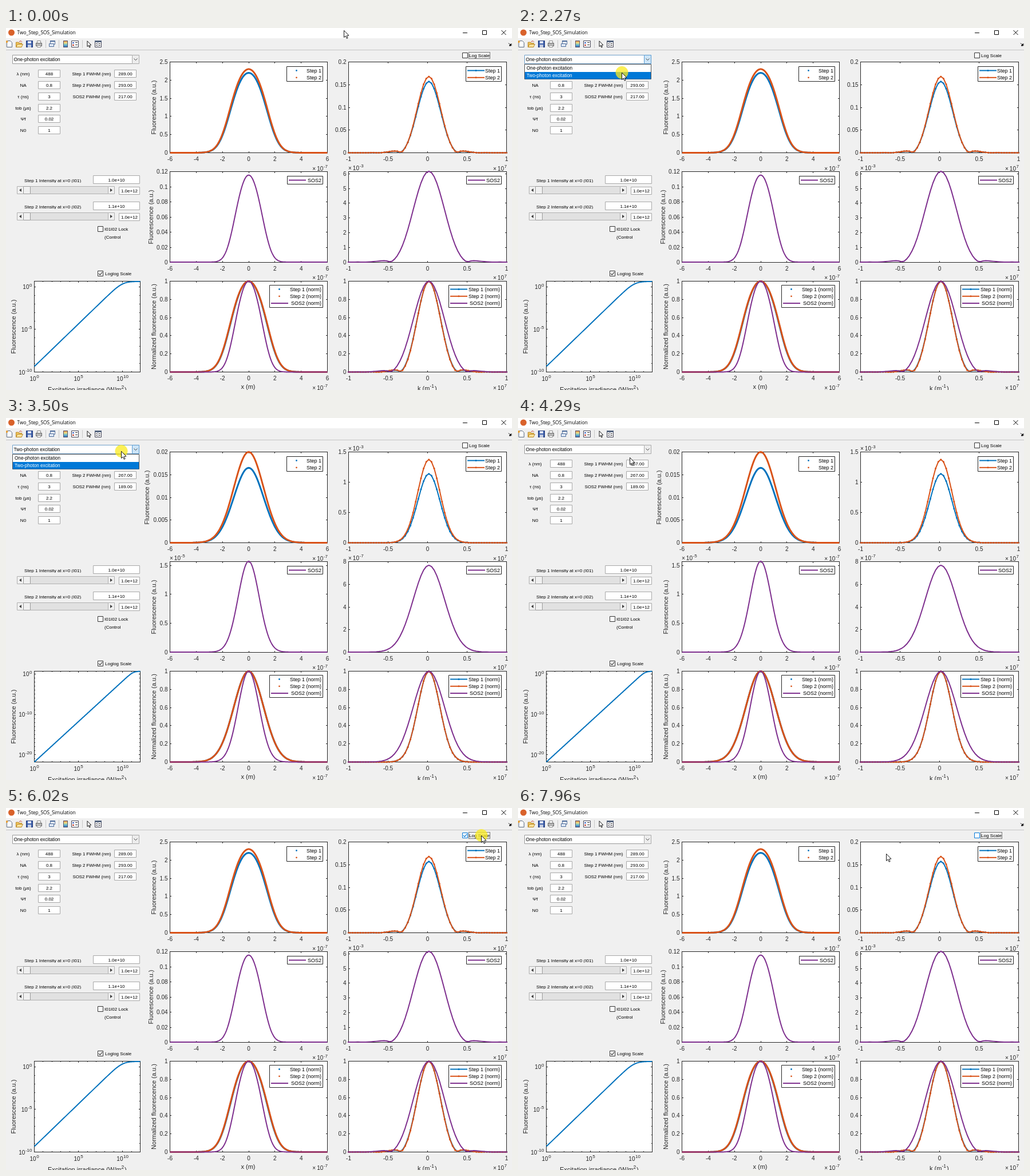
Write an HTML page with a canvas that moves like this. It is 884 px wide and 634 px high and loops after 8 s.

```html
<!DOCTYPE html>
<html lang="en">
<head>
<meta charset="utf-8">
<title>Two_Step_SOS_Simulation</title>
<style>
html, body { margin: 0; width: 100%; height: 100%; overflow: hidden; background: #f0f0f0; }
canvas { display: block; }
</style>
</head>
<body>
<canvas id="c" width="884" height="634"></canvas>
<script>
const g = document.getElementById('c').getContext('2d');
const LOOP = 8000, INK = '#262626';
const BLUE = '#0072bd', ORANGE = '#d95319', PURPLE = '#7e2f8e';
const SANS = '"Liberation Sans", Arial, sans-serif';

// ---------- drawing helpers ----------
function text(s, x, y, size = 8.1, align = 'left', color = '#000', font = SANS) {
  g.font = size + 'px ' + font;
  g.textAlign = align;
  g.fillStyle = color;
  g.fillText(s, x, y);
}
function box(x, y, w, h, fill, stroke) {
  if (fill) { g.fillStyle = fill; g.fillRect(x, y, w, h); }
  if (stroke) {
    g.strokeStyle = stroke;
    g.lineWidth = 1;
    g.strokeRect(x + .5, y + .5, w - 1, h - 1);
  }
}
function path(pts, color, width = 1, fill) {
  g.beginPath();
  pts.forEach(([x, y]) => g.lineTo(x, y));
  if (fill) { g.closePath(); g.fillStyle = fill; g.fill(); }
  if (color) { g.strokeStyle = color; g.lineWidth = width; g.lineJoin = 'round'; g.stroke(); }
}
function dot(x, y, r, color) {
  g.beginPath();
  g.arc(x, y, r, 0, 7);
  g.fillStyle = color;
  g.fill();
}
// "10^-7" style label: base with a raised exponent
function power(base, exp, x, y, align) {
  g.font = '10px ' + SANS;
  const w = g.measureText(base).width + .6;
  g.font = '8px ' + SANS;
  const all = w + g.measureText(exp).width;
  x -= align === 'right' ? all : align === 'center' ? all / 2 : 0;
  text(base, x, y, 10, 'left', INK);
  text(exp, x + w, y - 4.5, 8, 'left', INK);
}
const factor = (exp, x, y, align) => power('×\u200910', String(exp), x, y, align);
function label(s, x, y, align) {
  if (s[0] === '^') power('10', s.slice(1), x, y + .5, align);
  else text(s, x, y, 10, align, INK);
}
function upright(s, x, y) {
  g.save();
  g.translate(x, y);
  g.rotate(-Math.PI / 2);
  text(s, 0, 4, 11, 'center', INK);
  g.restore();
}

// ---------- model ----------
const FMAX = 4.336, SPAN = 3000; // SPAN in nm sets the frequency step 1 / SPAN
const sat = q => FMAX * q / (1 + q);
const scaled = (a, peak) => { const m = Math.max(...a); return a.map(v => v / m * peak); };

function model(o) {
  const X = [...Array(361)].map((_, i) => (i - 180) * 5);
  const q = X.map(x => o.q * Math.exp(-o.k * x * x));
  const f1 = q.map(sat), f2 = q.map(v => sat(v * o.r));
  const f = [f1, f2, f1.map((v, i) => o.r * v - f2[i])];
  const spectrum = a => [...Array(32)].map((_, n) => {
    const w = 2 * Math.PI * n / SPAN;
    return Math.abs(a.reduce((s, v, i) => s + v * Math.cos(w * X[i]), 0));
  });
  o.x = f.map((a, i) => scaled(a, o.px[i]));
  o.f = f.map((a, i) => scaled(spectrum(a), o.pk[i]));
  return o;
}
const WAIST = 488 / (Math.PI * .8);
const ONE = model({
  q: 1.03, k: 2 / WAIST ** 2, r: 1.1, order: 1, px: [2.2, 2.303, .115], pk: [.157, .168, .00614],
  x1: [2.5, .5], x2: [.12, .02], k1: [.2, .05], k2: [6.14, 1, -3],
  lab: [258, 253], ll: [-10, .66, 5], fwhm: ['289.00', '293.00', '217.00']
});
const TWO = model({
  q: .0038, k: 4 * Math.LN2 / 267 ** 2, r: 1.21, order: 2,
  px: [.0165, .02, 1.565e-5], pk: [1.14e-3, 1.375e-3, 7.65e-7],
  x1: [.02, .005], x2: [1.565, .5, -5], k1: [1.5, .5, -3], k2: [8, 2, -7],
  lab: [246, 258], ll: [-21.78, .66, 10], fwhm: ['267.00', '267.00', '189.00']
});

// ---------- axes ----------
const LEFT = 286, LW = 275, RIGHT = 598, RW = 276, H = 159;

function linear(min, max, step) {
  const out = [];
  for (let v = min; v <= max + 1e-9; v += step)
    out.push([(v - min) / (max - min), String(+v.toFixed(4))]);
  return out;
}
function decades(lo, hi, step) {
  const out = [];
  for (let e = Math.ceil(lo); e <= hi; e++)
    out.push([(e - lo) / (hi - lo), e % step ? '' : '^' + e]);
  return out;
}
function axes(x, top, w, xt, yt) {
  const y = Math.round(top);
  box(x, y, w + 1, H + 1, '#fff', INK);
  g.fillStyle = INK;
  for (const [p, s] of xt) {
    const px = Math.round(x + p * w), n = s ? 3 : 2;
    g.fillRect(px, y, 1, n);
    g.fillRect(px, y + H + 1 - n, 1, n);
  }
  for (const [p, s] of yt) {
    const py = Math.round(y + H - p * H), n = s ? 3 : 2;
    g.fillRect(x, py, n, 1);
    g.fillRect(x + w + 1 - n, py, n, 1);
  }
  for (const [p, s] of xt) if (s) label(s, x + p * w + .5, y + H + 15, 'center');
  for (const [p, s] of yt) if (s) label(s, x - 3.5, y + H - p * H + 4, 'right');
}
function clipped(x, y, w, draw) {
  g.save();
  g.beginPath();
  g.rect(x - 1, y - 1, w + 3, H + 4);
  g.clip();
  draw();
  g.restore();
}
function spaceCurve(y, data, max, color, width) {
  const pts = data.map((v, i) => [LEFT + .5 + LW * (.5 + (i - 180) * 5 / 1200), y + H + .5 - v / max * H])
    .filter(p => p[0] > LEFT && p[0] < LEFT + LW + 1);
  clipped(LEFT, y, LW, () => path(pts, color, width));
}
// the frequency grid is centred half a sample to the right of zero
function freqCurve(y, data, toUnit, color, dots) {
  const step = RW / 2 * 100 / SPAN, pts = [];
  for (let n = -31; n <= 30; n++)
    pts.push([RIGHT + .5 + RW / 2 + step * (n + .5), y + H + .5 - toUnit(data[Math.abs(n)]) * H]);
  clipped(RIGHT, y, RW, () => {
    path(pts, color, 2);
    if (dots) pts.forEach(p => dot(p[0], p[1], 1.5, color));
  });
}
function legend(x, y, w, rows, dots) {
  const h = rows.length === 1 ? 15 : rows.length === 2 ? 27 : 40;
  box(x, y, w, h, '#fff', INK);
  rows.forEach(([s, color], i) => {
    const cy = y + 7.5 + i * 12.3, mark = color !== PURPLE;
    if (dots && mark) dot(x + 17.5, cy, 1.4, color);
    else path([[x + 3, cy], [x + 33, cy]], color, 2);
    if (!dots && mark) dot(x + 18, cy, 1.5, color);
    text(s, x + w - 3, cy + 3.2, 9, 'right', '#000');
  });
}

function plots(m, log) {
  const xt = linear(-6, 6, 2), kt = linear(-1, 1, .5);
  const step = [['Step 1', BLUE], ['Step 2', ORANGE]], sos = [['SOS2', PURPLE]];
  const norm = [...step, ...sos].map(([s, c]) => [s + ' (norm)', c]);
  const colors = [BLUE, ORANGE, PURPLE];
  const top = [59, 250.5, 443];
  const unit = ([max, , e = 0]) => max * 10 ** e;

  [m.x1, m.x2, [1, .2]].forEach((a, row) => {
    const y = top[row];
    axes(LEFT, y, LW, xt, linear(0, a[0], a[1]));
    factor(-7, LEFT + LW + 1, y + 190.5, 'right');
    if (a[2]) factor(a[2], LEFT, y - 2, 'left');
    m.x.forEach((d, i) => {
      if (row === 2) spaceCurve(y, scaled(d, 1), 1, colors[i], i < 2 ? 3 : 2);
      else if ((i < 2) === (row === 0)) spaceCurve(y, d, unit(a), colors[i], i < 2 ? 3 : 2);
    });
  });
  legend(490, 67, 64, step, true);
  legend(491, 259, 63, sos);
  legend(460, 450, 94, norm, true);

  // lowest decade, highest decade, label step
  const range = [[-6.21, 0, 2], [-6, -2, 1], [-6, 0, 2]];
  [m.k1, m.k2, [1, .2]].forEach((a, row) => {
    const y = top[row], [lo, hi] = range[row];
    axes(RIGHT, y, RW, kt, log ? decades(...range[row]) : linear(0, a[0], a[1]));
    factor(7, RIGHT + RW + 1, y + 190.5, 'right');
    if (a[2] && !log) factor(a[2], RIGHT, y - 2, 'left');
    const toUnit = log ? v => (Math.log10(v) - lo) / (hi - lo) : v => v / unit(a);
    m.f.forEach((d, i) => {
      if (row === 2) freqCurve(y, scaled(d, 1), toUnit, colors[i], i < 2);
      else if ((i < 2) === (row === 0)) freqCurve(y, d, toUnit, colors[i], i < 2);
    });
  });
  legend(803, 67, 63, step);
  legend(804, 259, 62, sos);
  legend(773, 450, 93, norm);

  upright('Fluorescence (a.u.)', m.lab[0], 139);
  upright('Fluorescence (a.u.)', m.lab[1], 331);
  upright('Normalized fluorescence (a.u.)', 258, 523);
  text('x (m)', 423, 631.5, 11, 'center', INK);
  text('k (m', 719, 635, 11, 'left', INK);
  text('-1', 740.5, 630, 8.5, 'left', INK);
  text(')', 749, 635, 11, 'left', INK);

  const [lo, hi, every] = m.ll;
  axes(49, 443, 185, decades(0, 12, 5), decades(lo, hi, every));
  const pts = [...Array(121)].map((_, i) => {
    const f = Math.log10(sat(m.q * 10 ** (m.order * (i / 10 - 10))));
    return [49.5 + i / 120 * 185, 443.5 + H - (f - lo) / (hi - lo) * H];
  });
  clipped(49, 443, 185, () => path(pts, BLUE, 2));
  upright('Fluorescence (a.u.)', 13, 523);
  text('Excitation irradiance (W/m', 73, 637, 11, 'left', INK);
  text('2', 201.5, 632, 8.5, 'left', INK);
  text(')', 207, 637, 11, 'left', INK);
}

// ---------- window ----------
function titleBar() {
  box(0, 0, 884, 18, '#fff');
  dot(9.5, 8, 5.5, '#d9622b');
  text('Two_Step_SOS_Simulation', 19.5, 11.2, 8.4, 'left', '#000', '"Open Sans", sans-serif');
  path([[798, 8.5], [806, 8.5]], '#000');
  box(832, 4, 8, 8, null, '#000');
  path([[865.5, 4], [873.5, 12]], '#000');
  path([[873.5, 4], [865.5, 12]], '#000');
}
function toolBar() {
  box(0, 38, 884, 1, '#c4c4c4');
  for (const x of [69, 92, 133]) box(x, 21, 1, 14, '#c8c8c8');
  // new
  path([[1.5, 22.5], [7.5, 22.5], [10.5, 25.5], [10.5, 33.5], [1.5, 33.5]], '#5a6a80', 1, '#fff');
  dot(1.5, 24, 2, '#e8a33a');
  // open
  path([[17.5, 33], [17.5, 25], [22, 25], [23, 26.5], [27.5, 26.5], [27.5, 33]], '#b98a2c', 1, '#f0c45a');
  path([[17.5, 33.5], [20, 28.5], [29.5, 28.5], [27, 33.5]], '#b98a2c', 1, '#fbe29a');
  path([[23, 24], [26, 22.5], [28, 24.5]], '#c0392b');
  // save
  box(35, 22, 12, 12, '#3c5ea8', '#22397a');
  box(38, 23, 6, 4, '#e8eefc');
  box(38, 29, 6, 5, '#c3cbe0');
  // print
  box(54, 22, 7, 5, '#fff', '#888');
  box(52, 26, 11, 6, '#b9b9b9', '#666');
  box(54, 30, 7, 4, '#fff', '#888');
  // link
  box(77, 22, 9, 7, '#fff', '#4a6a9a');
  box(77, 22, 9, 2, '#4a6a9a');
  box(75, 27, 9, 6, '#dfe8f5', '#4a6a9a');
  // colour bar
  const bar = g.createLinearGradient(0, 22, 0, 34);
  ['#e0703a', '#f0e080', '#58b8d8', '#3050b0'].forEach((c, i) => bar.addColorStop(i / 3, c));
  box(100, 22, 8, 12, bar, '#556');
  // legend
  box(114, 22, 13, 12, '#fff', '#445');
  box(116, 25, 3, 2, '#3a62c0');
  box(116, 29, 3, 2, '#c0392b');
  box(121, 25, 4, 1, '#333');
  box(121, 29, 4, 1, '#333');
  arrow(141.5, 22.5, .8);
  // inspector
  box(155, 22, 12, 12, '#fff', '#445');
  box(155, 22, 12, 3, '#55657f');
  box(160, 25, 1, 9, '#889');
  for (const y of [27, 30]) { box(157, y, 2, 1, '#333'); box(162, y, 3, 1, '#333'); }
  path([[878, 26.5], [882.5, 31]], '#000');
  path([[882.5, 27.5], [882.5, 31], [879, 31]], '#000', 1, '#000');
}
function arrow(x, y, s = 1) {
  const shape = [[0, 0], [0, 12.2], [2.8, 9.7], [4.7, 14], [6.6, 13.2], [4.8, 9.1], [8.5, 8.8]];
  path(shape.concat([[0, 0]]).map(([a, b]) => [x + .5 + a * s, y + .3 + b * s]), '#000', .9, '#fff');
}
function field(x, y, w, h, s) {
  box(x, y, w, h, '#fff', '#a8a8a8');
  text(s, x + w / 2, y + h / 2 + 3, 8, 'center');
}
function check(x, y, on, color = '#333') {
  box(x, y, 10, 10, '#fff', color);
  if (on) path([[x + 2, y + 5], [x + 4.2, y + 7.3], [x + 8.2, y + 2.6]], color, 1.2);
}
function slider(y, n, value) {
  g.save();
  g.beginPath();
  g.rect(0, y, 140, 13);
  g.clip();
  text(`Step ${n} Intensity at x=0 (I0${n})`, 32, y + 12, 8.1);
  g.restore();
  field(152, y, 82, 15, value);
  box(19, y + 19, 171, 14, '#e1e1e1', '#b0b0b0');
  box(19, y + 19, 12, 14, '#f0f0f0', '#b0b0b0');
  box(178, y + 19, 12, 14, '#f0f0f0', '#b0b0b0');
  box(30, y + 19, 13, 14, '#f0f0f0', '#9a9a9a');
  path([[27, y + 23], [27, y + 29], [23, y + 26]], null, 0, '#404040');
  path([[182, y + 23], [182, y + 29], [186, y + 26]], null, 0, '#404040');
  field(197, y + 20, 37, 14, '1.0e+12');
}
function panel(m) {
  const left = [['λ (nm)', '488'], ['NA', '0.8'], ['τ (ns)', '3'], ['tob (μs)', '2.2'], ['Ψf', '0.02'], ['N0', '1']];
  left.forEach(([s, v], i) => {
    const y = 73 + Math.round(i * 19.85);
    text(s, 30, y + 10, 8.1, 'center');
    field(56, y, 39, 14, v);
  });
  ['Step 1', 'Step 2', 'SOS2'].forEach((s, i) => {
    text(s + ' FWHM (nm)', 149.5, 83 + i * 20, 7.9, 'center');
    field(189, 73 + i * 20, 39, 14, m.fwhm[i]);
  });
  slider(258, 1, '1.0e+10');
  slider(304, 2, '1.1e+10');
  check(160, 347, false);
  text('I01I02 Lock', 172, 355, 8);
  text('(Control', 172, 369, 8);
  check(160, 425, true);
  text('Loglog Scale', 173, 433, 8);
}
function combo(choice, open, hover, hot) {
  const items = ['One-photon excitation', 'Two-photon excitation'];
  box(11, 47, 222, 16, '#fff', hot ? '#6f9fc8' : '#999');
  box(220, 47, 13, 16, hot ? '#cce4f7' : '#ececec', hot ? '#5a9bd0' : '#aaa');
  path([[223.5, 53.5], [226.5, 56.5], [229.5, 53.5]], '#444');
  text(items[choice], 13.5, 58, 8.3);
  if (!open) return;
  box(11, 63, 222, 27, '#fff', '#555');
  box(12, 64 + hover * 13, 220, 12.5, '#0078d7');
  items.forEach((s, i) => text(s, 15, 73 + i * 13, 8.2, 'left', i === hover ? '#fff' : '#000'));
}
function logBox(on, focus, hot) {
  check(797, 43, on, hot ? '#0078d7' : '#333');
  text('Log Scale', 809, 51, 8.1);
  if (!focus) return;
  g.setLineDash([1, 1]);
  box(808, 42, 38, 12, null, '#000');
  g.setLineDash([]);
}

// ---------- timeline ----------
// start, end, number of steps, x, y
const MOVES = [
  [370, 970, 9, 220, 55], [1590, 1730, 3, 183, 76], [1960, 2040, 2, 181, 78],
  [2510, 2740, 4, 201, 59], [2880, 2880, 1, 201, 58], [3750, 3980, 4, 195, 69],
  [4510, 5110, 9, 797, 59], [5190, 5270, 2, 797, 56], [5500, 5720, 4, 830, 48],
  [7790, 7960, 3, 643, 80]
];
const CLICKS = [[1340, 1420], [2270, 2350], [3500, 3580], [4210, 4290], [5880, 6040], [7170, 7330]];

function pointer(t) {
  let x = 590, y = 4;
  for (const [a, b, n, tx, ty] of MOVES) {
    if (t < a) break;
    const i = n > 1 ? Math.min(n, Math.floor((t - a) / ((b - a) / (n - 1)) + 1e-6) + 1) : 1;
    const p = i / n, e = p * p * (3 - 2 * p);
    x += (tx - x) * e;
    y += (ty - y) * e;
  }
  return [x, y];
}

function draw(t) {
  const within = (a, b) => t >= a && t < b;
  const mode = within(3130, 4510) ? TWO : ONE;
  const open = within(1420, 2350) || within(3500, 4290);
  const hover = within(1960, 3830) ? 1 : 0;
  const [x, y] = pointer(t);
  const overCombo = x > 11 && x < 233 && y > 47 && y < 63;

  box(0, 0, 884, 634, '#f0f0f0');
  titleBar();
  toolBar();
  plots(mode, within(6720, 7790));
  panel(mode);
  combo(within(2350, 4290) ? 1 : 0, open, hover, open || overCombo);
  logBox(within(5960, 7250), t < 1340 || t >= 5960, t >= 5650);
  if (CLICKS.some(c => within(...c))) dot(x + .5, y, 11, 'rgba(250,234,30,.75)');
  arrow(x, y);
}

const start = performance.now();
function tick() {
  draw((performance.now() - start) % LOOP);
  requestAnimationFrame(tick);
}
tick();
</script>
</body>
</html>
```
